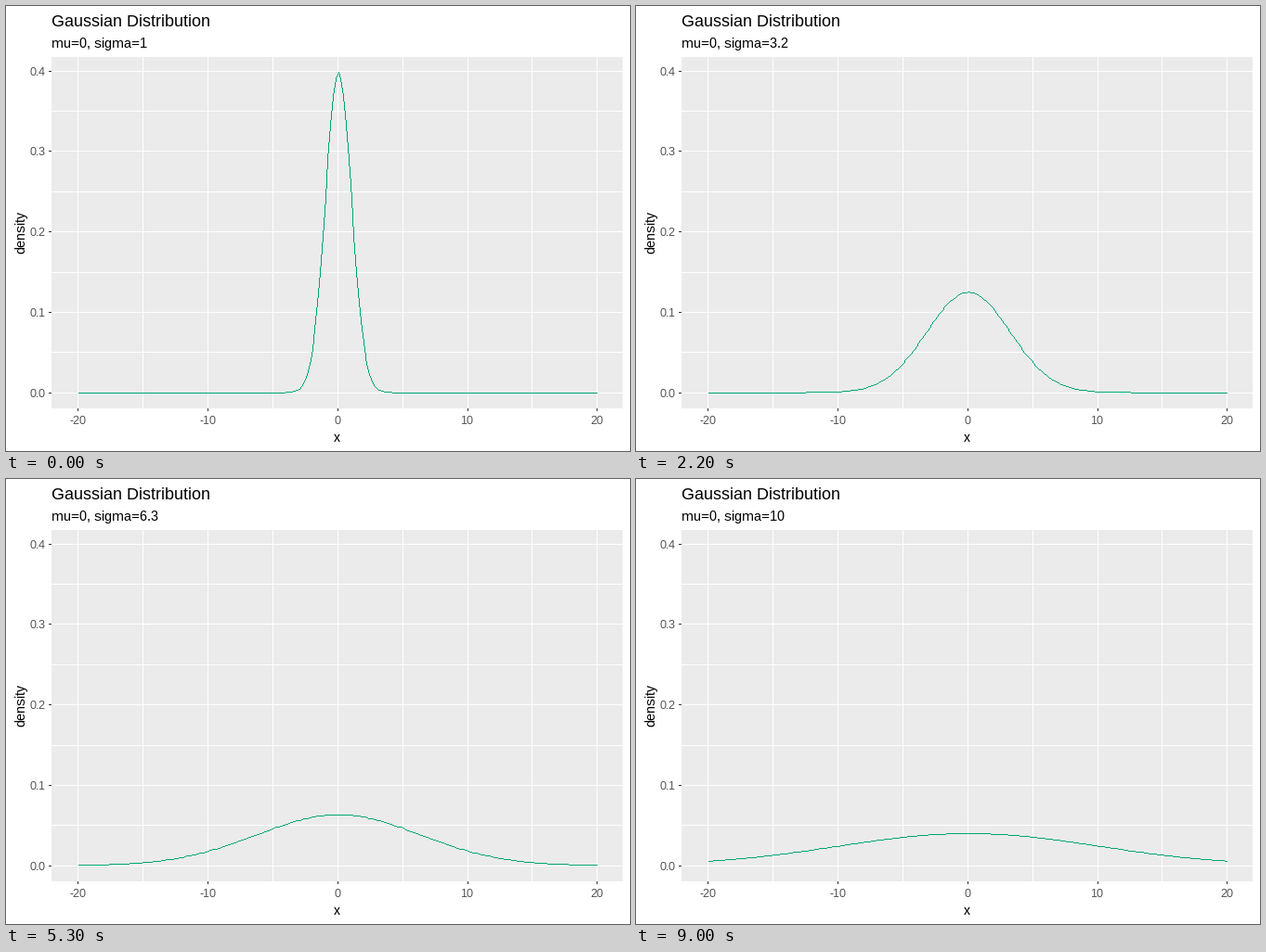
These frames come from a looping animation (672x480 px, 9.1 s). A matplotlib script:

```python
import numpy as np
import matplotlib.pyplot as plt
from matplotlib.animation import FuncAnimation
from matplotlib.patches import Rectangle

W, H, DPI = 672, 480, 96
FRAMES, INTERVAL = 91, 100
PX = 72 / DPI

LEFT, RIGHT, TOP, BOTTOM = 49, 664, 55, 434
X0, X_UNIT = 357.1, 13.992
Y0, Y_UNIT = 417.055, 866.9
PANEL, TICK, LABEL, CURVE = "#EBEBEB", "#333333", "#4D4D4D", "#00A572"

plt.rcParams.update({
    "font.family": "Liberation Sans",
    "text.hinting": "native",
    "text.hinting_factor": 1,
})

fig = plt.figure(figsize=(W / DPI, H / DPI), dpi=DPI, facecolor="white")
ax = fig.add_axes([0, 0, 1, 1])
ax.set(xlim=(0, W), ylim=(H, 0))
ax.axis("off")


def col(x):
    return np.floor(X0 + X_UNIT * np.asarray(x))


def row(y):
    return np.floor(Y0 - Y_UNIT * np.asarray(y))


def rect(x, y, w, h, color):
    ax.add_patch(Rectangle((x, y), w, h, fc=color, lw=0, antialiased=False))


def label(x, y, text, px, color="black", **kw):
    return ax.text(x, y, text, fontsize=px * PX, color=color,
                   va="baseline", **kw)


def trace(points):
    """Pixels of a one-pixel polyline through whole-number points."""
    runs = [np.linspace(p, q, int(abs(q - p).max()) + 1)
            for p, q in zip(points[:-1], points[1:])]
    return np.unique(np.rint(np.concatenate(runs)), axis=0)


rect(LEFT, TOP, RIGHT - LEFT, BOTTOM - TOP, PANEL)
for v in range(-20, 21, 5):
    rect(col(v), TOP, 1, BOTTOM - TOP, "white")
for k in range(9):
    rect(LEFT, row(k * 0.05), RIGHT - LEFT, 1, "white")

for v in range(-20, 21, 10):
    rect(col(v), BOTTOM, 1, 3, TICK)
    label(col(v), 451, str(v), 12, LABEL, ha="center")
for k in range(5):
    y = row(k / 10)
    rect(LEFT - 3, y, 3, 1, TICK)
    label(43, y + 5, f"{k / 10:.1f}", 12, LABEL, ha="right")

label(49, 22, "Gaussian Distribution", 18)
label(356.5, 470, "x", 15, ha="center")
label(20, 244, "density", 15, ha="center", rotation=90, rotation_mode="anchor")
subtitle = label(49, 45, "", 15)

xs = np.linspace(-20, 20, 201)
cols = np.minimum(col(xs), col(20) - 1)
curve, = ax.plot([], [], ",", color=CURVE, zorder=3)


def update(i):
    sigma = 1 + i / 10
    density = np.exp(-0.5 * (xs / sigma) ** 2) / (sigma * np.sqrt(2 * np.pi))
    pixels = trace(np.column_stack([cols, row(density)]))
    curve.set_data(*(pixels + 0.5).T)
    subtitle.set_text(f"mu=0, sigma={sigma:.3g}")
    return curve, subtitle


anim = FuncAnimation(fig, update, frames=FRAMES, interval=INTERVAL,
                     repeat=True, repeat_delay=0)
plt.show()
```
